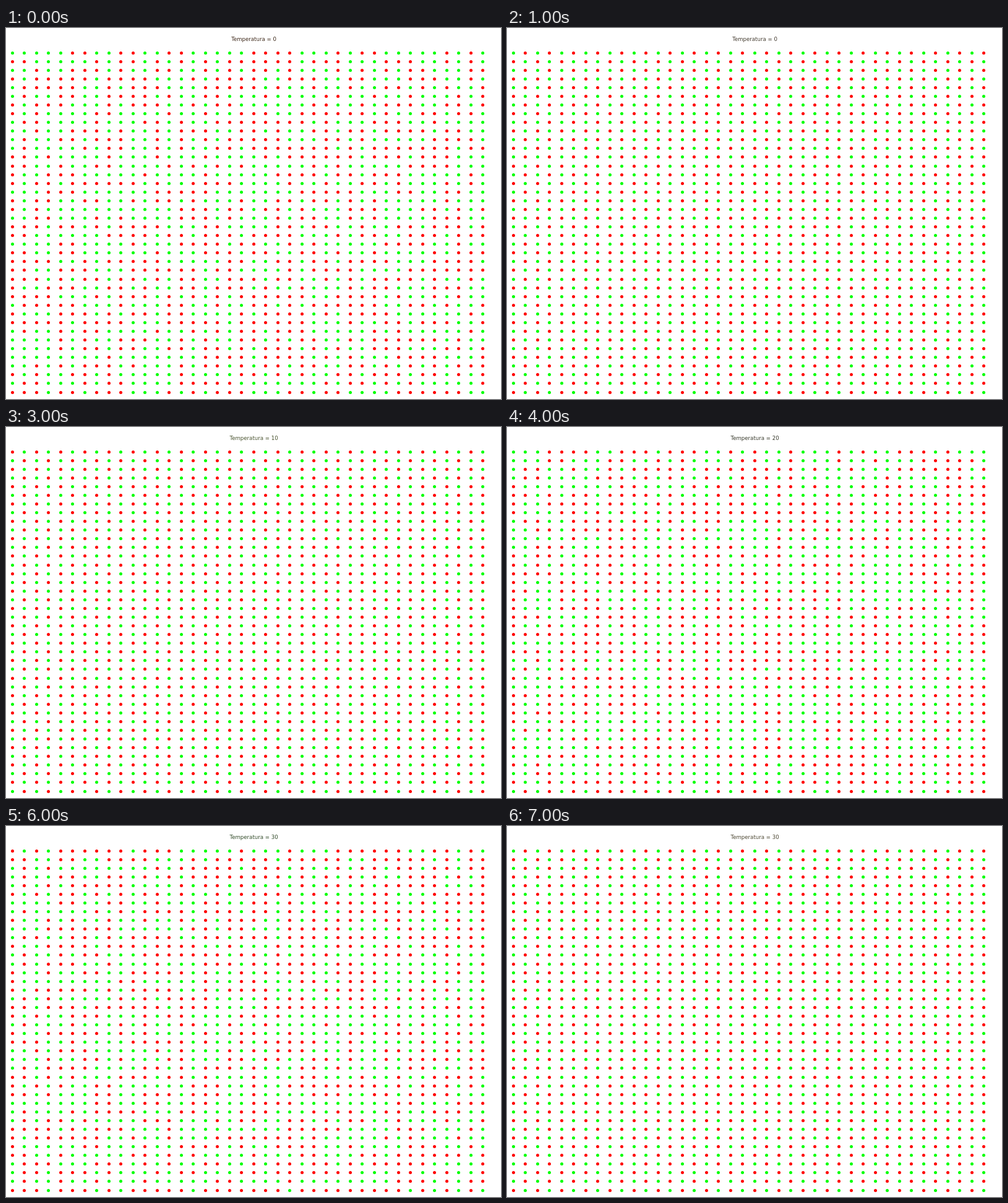
Write an HTML page that moves like this. It is 800x600 px and loops after 8 s.

```html
<!DOCTYPE html>
<html lang="es">
<head>
<meta charset="utf-8">
<style>
  html, body { margin: 0; width: 100%; height: 100%; overflow: hidden; background: #fff; }
  svg { display: block; }
  text { font: 8.6px "DejaVu Sans", sans-serif; text-anchor: middle; }
</style>
</head>
<body>
<svg id="stage" width="800" height="600" viewBox="0 0 800 600">
  <text id="title" x="400.5" y="21"></text>
</svg>
<script>
const NS = 'http://www.w3.org/2000/svg';
const SIZE = 40, STEP = 1000;
const RED = '#f00', GREEN = '#0f0';
const stage = document.getElementById('stage');
const title = document.getElementById('title');

// seed: disordered lattice; phase: checkerboard, 0 starts with red
const scenes = [
  { temp: 0, seed: 11, ink: '#3a2415' },
  { temp: 0, phase: 1, ink: '#40382c' },
  { temp: 10, seed: 23, ink: '#333330' },
  { temp: 10, phase: 0, ink: '#46502c' },
  { temp: 20, seed: 37, ink: '#36382a' },
  { temp: 20, phase: 1, ink: '#694638' },
  { temp: 30, seed: 41, ink: '#2f4826' },
  { temp: 30, phase: 1, ink: '#4a4530' }
];

function random(seed) {
  let s = seed * 7919;
  return () => {
    s = (s + 0x6D2B79F5) | 0;
    let t = Math.imul(s ^ (s >>> 15), s | 1);
    t ^= t + Math.imul(t ^ (t >>> 7), t | 61);
    return ((t ^ (t >>> 14)) >>> 0) / 4294967296;
  };
}

const dots = [];
for (let row = 0; row < SIZE; row++) {
  for (let col = 0; col < SIZE; col++) {
    const el = document.createElementNS(NS, 'circle');
    el.setAttribute('cx', Math.round(10 + col * 760 / 39) + 0.5);
    el.setAttribute('cy', Math.floor(40 + row * 549 / 39) + 0.5);
    el.setAttribute('r', 2.5);
    stage.appendChild(el);
    dots.push({ el, row, col });
  }
}

let shown = -1;
function draw(time) {
  const index = Math.floor(time / STEP) % scenes.length;
  if (index === shown) return;
  shown = index;
  const { temp, seed, phase, ink } = scenes[index];
  const next = random(seed || 1);
  title.textContent = 'Temperatura = ' + temp;
  title.setAttribute('fill', ink);
  for (const { el, row, col } of dots) {
    const green = seed ? next() < 0.5 : (row + col + phase) % 2 === 1;
    el.setAttribute('fill', green ? GREEN : RED);
  }
}

const start = performance.now();
function tick() {
  draw(performance.now() - start);
  requestAnimationFrame(tick);
}
tick();
</script>
</body>
</html>
```
